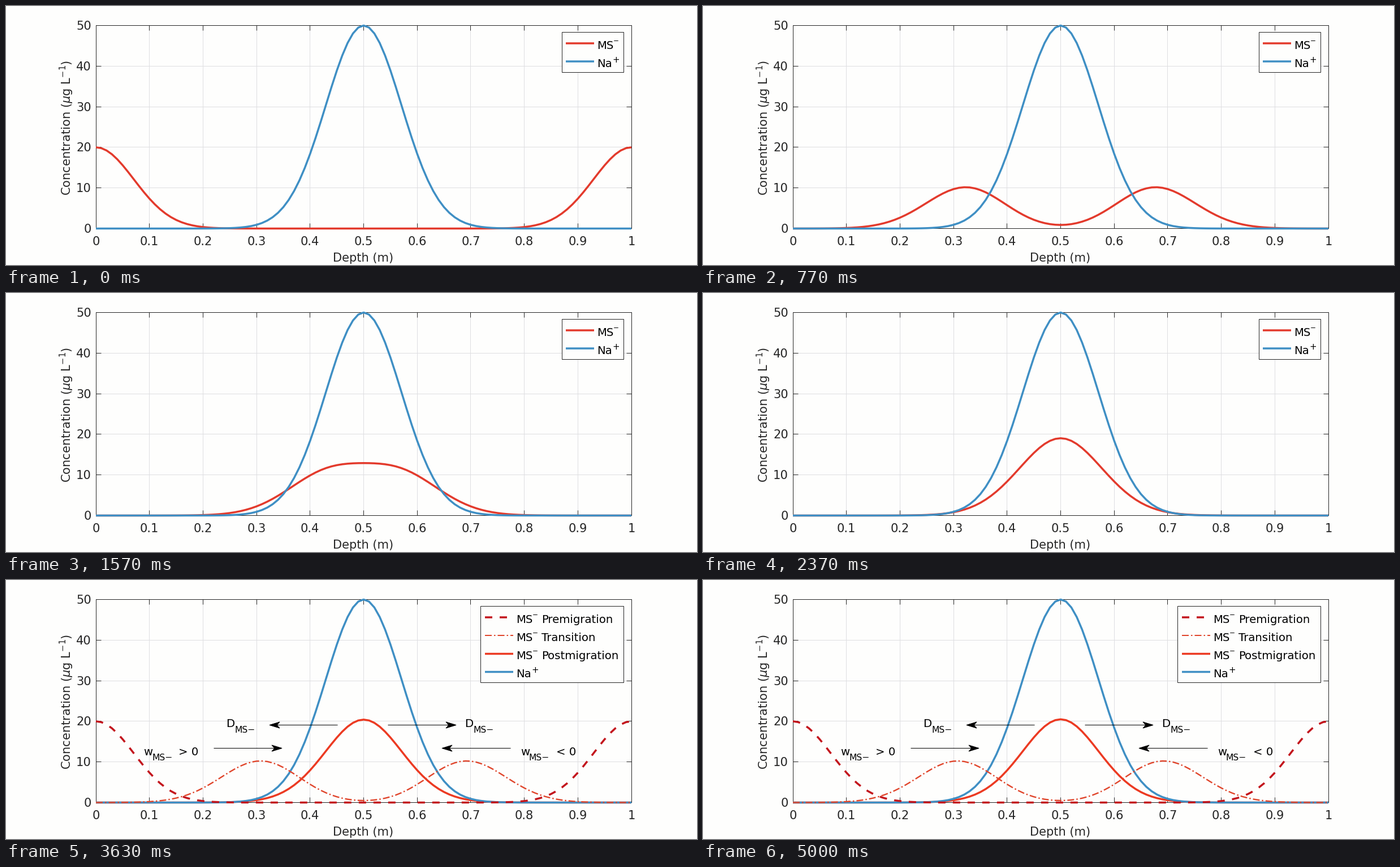
A matplotlib script that plays this animation: 1222 px wide and 458 px high, repeating every 5030 ms.

```python
import numpy as np
import matplotlib.pyplot as plt
from matplotlib.animation import FuncAnimation
from matplotlib.patches import Polygon, Rectangle

W, H, DPI = 1222, 458, 64
PT = 72 / DPI                       # points per pixel
FRAMES, LOOP_MS = 151, 5030
SWITCH, TRANSITION = 75, 21

LEFT, RIGHT, TOP, BOTTOM = 159, 1106, 34.5, 393.5
INK, GRID, PAPER = "#262626", "#dedee1", "#fefefd"
RED, BLUE = "#e33a2c", "#3f8fc4"
DARK_RED, ORANGE_RED, POST_RED = "#c3161d", "#e0452b", "#ec3a22"
TICK_SIZE, NOTE_SIZE, SUB_SIZE = 21, 19.8, 15.6
MINUS = "\u2212"

plt.rcParams["font.family"] = "DejaVu Sans"
plt.rcParams["mathtext.fontset"] = "dejavusans"


def migrate(start, dx, rate=0.0399, diffusion=0.000197, substeps=20):
    """Upwind advection towards the middle plus diffusion, closed ends."""
    faces = (np.arange(len(start) - 1) + 0.5) * dx
    speed = rate * (0.5 - faces)
    c = start.copy()
    profiles = [c.copy()]
    for _ in range(FRAMES - 1):
        for _ in range(substeps):
            flux = speed * np.where(speed > 0, c[:-1], c[1:])
            flux -= diffusion * np.diff(c) / dx
            step = flux / (dx * substeps)
            c[:-1] -= step
            c[1:] += step
        profiles.append(c.copy())
    return profiles


depth = np.linspace(0, 1, 101)
sodium = 50 * np.exp(-((depth - 0.5) / 0.1) ** 2)
initial = 20 * (np.exp(-(depth / 0.1) ** 2) + np.exp(-((depth - 1) / 0.1) ** 2))
profiles = migrate(initial, 0.01)

fig = plt.figure(figsize=(W / DPI, H / DPI), dpi=DPI, facecolor=PAPER)
ax = fig.add_axes([0, 0, 1, 1])
ax.set_xlim(0, W)
ax.set_ylim(H, 0)
ax.axis("off")


def px(x):
    return LEFT + (RIGHT - LEFT) * x


def py(value):
    return BOTTOM - (BOTTOM - TOP) * value / 50


def line(x, y, color, width, dashes=None, z=2):
    style = "-" if dashes is None else (0, [d / width for d in dashes])
    return ax.plot(x, y, color=color, lw=width * PT, ls=style, zorder=z,
                   dash_capstyle="butt", solid_capstyle="butt",
                   solid_joinstyle="round", snap=False)[0]


def rule(x0, y0, x1, y1, color=INK, z=1):
    """One-pixel straight line through the centres of its pixels."""
    x, y = np.floor([x0, x1]) + 0.5, np.floor([y0, y1]) + 0.5
    return line(x, y, color, 1, z=z)


def box(x0, y0, x1, y1, z, fill=PAPER):
    x0, y0, x1, y1 = np.floor([x0, y0, x1, y1]) + 0.5
    return ax.add_patch(Rectangle((x0, y0), x1 - x0, y1 - y0, fc=fill, ec=INK,
                                  lw=PT, zorder=z, snap=False))


def text(x, y, s, size=NOTE_SIZE, color="black", ha="left", **kw):
    return ax.text(x, y, s, fontsize=size * PT, color=color, ha=ha,
                   va="baseline", zorder=9, **kw)


def legend_row(x, y, color, width, ion, sign, word="", dashes=None):
    if sign == MINUS:
        mark = text(x + 84, y - 1, sign, 12)
    else:
        mark = text(x + 82, y + 1.5, sign, 15)
    return [line([x, x + 50], [y, y], color, width, dashes, z=8), mark,
            text(x + 55, y + 10, ion), text(x + 100, y + 10, word)]


def arrow(x0, x1, y):
    d = np.sign(x1 - x0)
    mid = y + 0.5
    head = [(x1, mid), (x1 - 18 * d, mid - 5.5), (x1 - 13 * d, mid),
            (x1 - 18 * d, mid + 5.5)]
    return [rule(x0, y, x1 - 13 * d, y, "black", z=6),
            ax.add_patch(Polygon(head, fc="black", ec="black", lw=PT,
                                 joinstyle="miter", zorder=6))]


def symbol(x, y, letter, sub_x, rest="", rest_x=0):
    return [text(x, y, letter), text(sub_x, y + 9.5, "MS" + MINUS, SUB_SIZE),
            text(rest_x, y, rest)]


# Grid, ticks and frame
for i in range(11):
    x = px(i / 10)
    rule(x, TOP, x, BOTTOM, GRID, z=0)
    rule(x, BOTTOM, x, BOTTOM - 9)
    rule(x, TOP, x, TOP + 9)
    text(x, 423, f"{i / 10:g}", TICK_SIZE, INK, "center")
for value in range(0, 60, 10):
    y = py(value)
    rule(LEFT, y, RIGHT, y, GRID, z=0)
    rule(LEFT, y, LEFT + 9, y)
    rule(RIGHT, y, RIGHT - 9, y)
    text(151, y + 7.5, str(value), TICK_SIZE, INK, "right")
box(LEFT, TOP, RIGHT, BOTTOM, 1, "none")
text(632, 452.5, "Depth (m)", TICK_SIZE, INK, "center")
text(115, 335, r"Concentration ($\mu$g L$^{-1}$)", TICK_SIZE, INK,
     rotation=90, rotation_mode="anchor")

# Curves
DASH, DASH_DOT = (13, 13), (12, 4, 2.5, 4)
xs = px(depth)
moving = line(xs, py(initial), RED, 3.5, z=2)
line(xs, py(sodium), BLUE, 3.5, z=3)

before = [box(983, 46, 1092, 117, 7)]
before += legend_row(990, 66, RED, 3.5, "MS", MINUS)
before += legend_row(990, 98, BLUE, 3.5, "Na", "+")

after = [line(xs, py(initial), DARK_RED, 3.5, DASH, z=4),
         line(xs, py(profiles[TRANSITION]), ORANGE_RED, 2.4, DASH_DOT, z=5),
         box(839, 46, 1092, 181, 7)]
after += legend_row(847, 66, DARK_RED, 3.5, "MS", MINUS, "Premigration", DASH)
after += legend_row(847, 98, ORANGE_RED, 2, "MS", MINUS, "Transition", DASH_DOT)
after += legend_row(847, 130.5, POST_RED, 3.5, "MS", MINUS, "Postmigration")
after += legend_row(847, 162.5, BLUE, 3.5, "Na", "+")
after += arrow(586, 466, 256) + arrow(675, 796, 256)
after += arrow(367, 488, 297) + arrow(892, 771, 297)
after += symbol(389, 260.5, "D", 405) + symbol(811, 260.5, "D", 827)
after += symbol(243, 309.5, "w", 258, "> 0", 305)
after += symbol(910, 309.5, "w", 925, "< 0", 973)


def update(frame):
    late = frame >= SWITCH
    moving.set_ydata(py(profiles[frame]))
    moving.set_color(POST_RED if late else RED)
    for artist in before:
        artist.set_visible(not late)
    for artist in after:
        artist.set_visible(late)
    return [moving, *before, *after]


anim = FuncAnimation(fig, update, frames=FRAMES, interval=LOOP_MS / FRAMES,
                     repeat=True, repeat_delay=0, blit=False)
plt.show()
```
